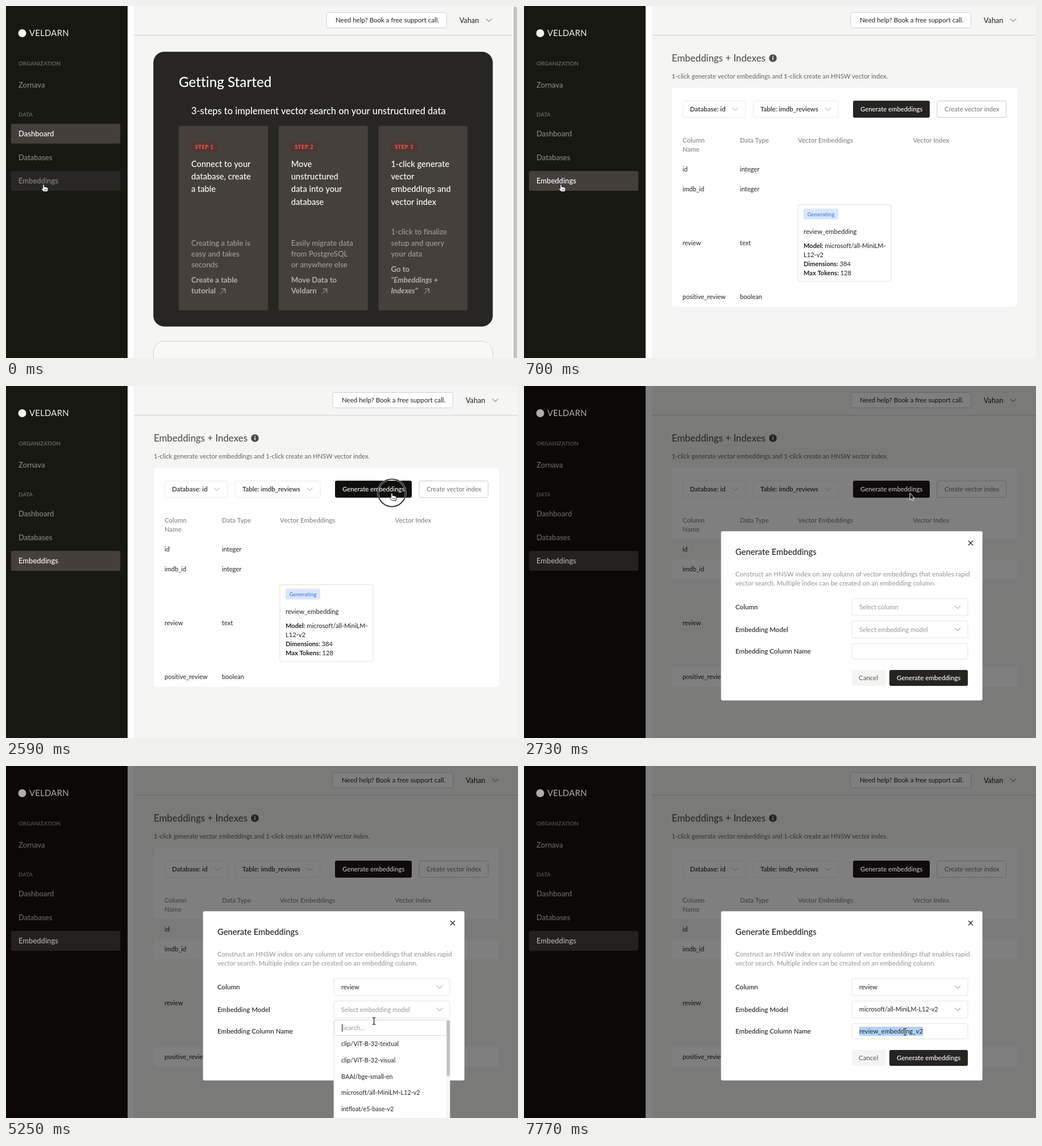
Animation, 901 px wide and 621 px high, one loop 8 s. Source, as an HTML page with a canvas:

```html
<!DOCTYPE html>
<html lang="en">
<head>
<meta charset="utf-8">
<title>Embeddings walkthrough</title>
<style>
html, body { margin: 0; width: 100%; height: 100%; overflow: hidden; background: #f5f5f3; }
canvas { display: block; width: 901px; height: 621px; }
</style>
</head>
<body>
<canvas id="stage"></canvas>
<script>
const W = 901, H = 621, LOOP = 8000, STEP = 70;
const canvas = document.getElementById('stage');
const c = canvas.getContext('2d');
const dpr = window.devicePixelRatio || 1;
canvas.width = W * dpr;
canvas.height = H * dpr;

const BG = '#f5f5f3', DARK = '#252420', INK = '#22211e', MUTED = '#8b8985';
const BRAND = 'Veldarn';
const LIT = { bar: '#181813', brand: '#f4f4f0', label: '#66635d', item: MUTED, on: '#fff',
  fill: '#453f3b', hover: '#282723', button: DARK, caption: '#fff' };
const DIM = { bar: '#0c0808', brand: '#b0aeac', label: '#4c4a48', item: '#6a6866', on: '#b5b3b0',
  fill: '#232020', hover: '#151212', button: '#0f0a0b', caption: '#c0bebc' };

// y is the middle of the capitals; any spacing above zero turns ligatures off
function txt(s, x, y, size, color, weight = 400, spacing = 0.01) {
  c.letterSpacing = spacing + 'px';
  c.font = `${weight} ${size}px Lato, Inter, sans-serif`;
  c.fillStyle = color;
  c.fillText(s, x, y + size * 0.36);
  return c.measureText(s).width;
}

function lines(list, x, y, pitch, size, color, weight) {
  list.forEach((s, i) => txt(s, x, y + i * pitch, size, color, weight));
}

function box(x, y, w, h, r, fill, border) {
  c.beginPath();
  c.roundRect(x, y, w, h, r);
  if (fill) { c.fillStyle = fill; c.fill(); }
  if (border) { c.strokeStyle = border; c.lineWidth = 1; c.stroke(); }
}

function stroke(points, color, width = 1) {
  c.beginPath();
  points.forEach(([x, y]) => c.lineTo(x, y));
  c.strokeStyle = color;
  c.lineWidth = width;
  c.stroke();
}

function disc(x, y, r, color) {
  c.beginPath();
  c.arc(x, y, r, 0, 7);
  c.fillStyle = color;
  c.fill();
}

const chevron = (x, y, color) =>
  stroke([[x - 5, y - 2.5], [x, y + 2.5], [x + 5, y - 2.5]], color);

function diagonal(x, y, color) {
  stroke([[x - 4.5, y + 4.5], [x + 4, y - 4]], color);
  stroke([[x - 3.5, y - 4], [x + 4, y - 4], [x + 4, y + 3.5]], color);
}

function sidebar(tone, active, hover) {
  c.fillStyle = tone.bar;
  c.fillRect(0, 0, 214, H);
  disc(28.5, 48, 7, tone.brand);
  txt(BRAND.toUpperCase(), 41, 47.5, 14.8, tone.brand, 400, 0.3);
  txt('ORGANIZATION', 22, 102, 9.7, tone.label, 700);
  txt('Zornava', 22, 139.5, 13, tone.item, 500);
  txt('DATA', 22, 191.5, 9.7, tone.label, 700);
  ['Dashboard', 'Databases', 'Embeddings'].forEach((name, i) => {
    const y = 225.3 + i * 41.6, on = i === active;
    if (on || i === hover) box(8.8, y - 17.5, 192.4, 35, 3, on ? tone.fill : tone.hover);
    txt(name, 22, y, 13, on ? tone.on : tone.item, 500);
  });
}

function header(dx, right) {
  c.fillStyle = '#fff';
  c.fillRect(214, 0, 11, H);
  stroke([[225, 51.5], [right, 51.5]], '#d0d0ce');
  box(564 + dx, 11.5, 211.5, 27, 3, '#fff', '#cfcfcd');
  txt('Need help? Book a free support call.', 580 + dx, 25, 11.5, INK);
  txt('Vahan', 798 + dx, 25, 12.6, INK);
  chevron(850 + dx, 25, '#44423e');
}

const STEPS = [
  { head: ['Connect to your', 'database, create', 'a table'],
    body: ['Creating a table is', 'easy and takes', 'seconds'],
    link: ['Create a table', 'tutorial'], arrow: 78 },
  { head: ['Move', 'unstructured', 'data into your', 'database'],
    body: ['Easily migrate data', 'from PostgreSQL', 'or anywhere else'],
    link: ['Move Data to', BRAND], arrow: 81 },
  { head: ['1-click generate', 'vector', 'embeddings and', 'vector index'],
    body: ['1-click to finalize', 'setup and query', 'your data'],
    link: ['"Embeddings +', 'Indexes"'], arrow: 85, lead: 'Go to' }
];

function dashboard() {
  header(0, 891);
  c.fillStyle = '#fafafa';
  c.fillRect(891, 0, 10, H);
  box(893, 1, 6.5, 625, 3, '#c3c3c1');
  box(259.3, 80.7, 597.3, 484.7, 19, '#272622');
  box(259.5, 591.5, 597, 80, 19, '#f8f8f7', '#d2d2d0');
  txt('Getting Started', 304, 134, 24.2, '#fff', 500);
  txt('3-steps to implement vector search on your unstructured data', 326, 185, 16.4, '#fff', 500);
  STEPS.forEach((s, i) => {
    const x = 304 + i * 175.7, tx = x + 22, up = s.lead ? 19.3 : 0;
    box(x, 211.5, 157, 325.5, 3, '#45403b');
    box(tx, 238.5, 46, 19, 3, '#503733');
    txt('STEP ' + (i + 1), tx + 6.5, 248, 9.8, '#fb5a51', 700, 0.3);
    lines(s.head, tx, 278.5, 22.3, 14.6, '#fff', 500);
    lines(s.body, tx, 418 - up, 19.2, 13.2, '#a39e98', 500);
    if (s.lead) txt(s.lead, tx, 464, 13.2, '#b4afa9', 700);
    lines(s.link, tx, 483, 19.3, 13.2, '#b4afa9', s.lead ? 'italic 700' : 700);
    diagonal(x + s.arrow, 503, '#b4afa9');
  });
}

function combo(x, w, label) {
  box(x + 0.5, 167.5, w, 29, 3, '#fff', '#ebebe9');
  txt(label, x + 13, 182, 11.5, INK, 500);
  chevron(x + w - 18, 182, '#a5a3a0');
}

function field(label, y, faded) {
  box(577, y - 15, 204, 30, 3, '#fff', '#e4e4e2');
  txt(label, 590, y, faded ? 11.2 : 10.8, faded ? '#999793' : INK);
  chevron(763, y, '#85837f');
}

function generate(fill, caption) {
  box(579, 167, 135, 30, 3, fill);
  txt('Generate embeddings', 592, 182, 11.3, caption, 500);
}

function indexes(zebra) {
  header(11, W);
  txt('Embeddings + Indexes', 260, 92, 16.8, '#55534f', 500);
  disc(438, 92, 6.8, '#4c4a47');
  c.fillStyle = '#fff';
  c.fillRect(437.2, 90.8, 1.7, 4.6);
  c.fillRect(437.2, 88, 1.7, 1.7);
  txt('1-click generate vector embeddings and 1-click create an HNSW vector index.',
    260, 124, 11.1, '#65635f');
  box(260, 144.5, 608, 386, 5, '#fff');
  if (zebra) {
    c.fillStyle = BG;
    c.fillRect(260, 270, 608, 36);
    c.fillRect(260, 341, 608, 155);
  }
  combo(279, 110.5, 'Database: id');
  combo(403, 149.5, 'Table: imdb_reviews');
  box(727, 167.5, 121.5, 29, 3, '#fff', '#cacac8');
  txt('Create vector index', 740, 182, 11.2, '#73716d');

  lines(['Column', 'Name'], 279, 237, 16, 11.4, '#85837f', 500);
  txt('Data Type', 380, 237, 11.4, '#85837f', 500);
  txt('Vector Embeddings', 482, 237, 11.4, '#85837f', 500);
  txt('Vector Index', 684.5, 237, 11.4, '#85837f', 500);
  [['id', 'integer', 288], ['imdb_id', 'integer', 323.5],
   ['review', 'text', 418.5], ['positive_review', 'boolean', 513.5]].forEach(([name, type, y]) => {
    txt(name, 279, y, 11.1, INK);
    txt(type, 380, y, 11.1, INK);
  });

  box(482, 350.5, 164, 135.5, 2, '#fff', '#e0e0de');
  box(492, 357.5, 61, 19, 2, '#d9e7fd');
  txt('Generating', 498.5, 367.5, 9.8, '#4078e0', 500);
  txt('review_embedding', 492, 398, 11.3, INK);
  [['Model:', 'microsoft/all-MiniLM-', 423], ['Dimensions:', '384', 455],
   ['Max Tokens:', '128', 471]].forEach(([key, value, y]) => {
    const w = txt(key + ' ', 492, y, 11.1, INK, 700);
    txt(value, 492 + w, y, 11.1, INK);
  });
  txt('L12-v2', 492, 439, 11.1, INK);
}

const MODELS = ['clip/ViT-B-32-textual', 'clip/ViT-B-32-visual', 'BAAI/bge-small-en',
  'microsoft/all-MiniLM-L12-v2', 'intfloat/e5-base-v2'];

function search(y, w, caret) {
  box(577.5, y + 0.5, w, 27, 2, '#fff', '#dcdcda');
  txt('Search...', 590, y + 14, 11.2, '#999793');
  if (caret) stroke([[591.5, y + 7], [591.5, y + 21]], '#222');
}

function shade() {
  c.fillStyle = 'rgba(0,0,0,.5)';
  c.fillRect(0, 0, W, H);
}

function modal(t) {
  box(346.7, 256.2, 460, 298.5, 3, '#fff');
  stroke([[782, 273], [790, 281]], '#222', 1.3);
  stroke([[790, 273], [782, 281]], '#222', 1.3);
  txt('Generate Embeddings', 372, 293, 14.7, INK, 500);
  lines(['Construct an HNSW index on any column of vector embeddings that enables rapid',
    'vector search. Multiple index can be created on an embedding column.'],
    372, 331.5, 16, 11.4, '#94928e');
  txt('Column', 372, 390, 11.6, INK, 500);
  txt('Embedding Model', 372, 429.5, 11.6, INK, 500);
  txt('Embedding Column Name', 372, 468, 11.6, INK, 500);

  const column = t >= 4410, model = t >= 6510;
  field(column ? 'review' : 'Select column', 390, !column);
  field(model ? MODELS[3] : 'Select embedding model', 429.5, !model);
  box(577, 454.5, 204, 27, 3, '#fff', '#e4e4e2');
  if (model) {
    const name = 'review_embedding_v2';
    c.font = '400 11.4px Lato, Inter, sans-serif';
    if (t >= 7560) {
      c.fillStyle = '#b0d3fb';
      c.fillRect(590, 460, c.measureText(name).width, 16);
    }
    txt(name, 590, 468, 11.4, INK);
  }
  box(577, 501, 60, 28, 3, '#f4f4f2');
  txt('Cancel', 589, 515, 11.5, '#65635f', 500);
  box(643, 501, 138, 28, 3, DARK);
  txt('Generate embeddings', 656, 515, 11.6, '#fff', 500);

  if (t >= 3710 && t < 4410) {
    box(577, 408, 204, 57, 2, '#fff', '#e2e2e0');
    search(408, 203, true);
    txt('review', 590, 450.5, 10.8, INK);
  }
  if (t >= 4970 && t < 6510) {
    box(577, 448, 204, 200, 2, '#fff', '#e2e2e0');
    search(448, 197.5, t < 5530);
    lines(MODELS, 590, 490.5, 28.7, 10.8, INK);
    c.fillStyle = '#f6f6f5';
    c.fillRect(775, 448, 6, H - 448);
    box(775.5, 448.5, 5.5, 98.5, 2.5, '#c1c1bf');
  }
}

const HAND = new Path2D('M-1.3 8V1.3Q-1.3 0 0 0Q1.3 0 1.3 1.3V4.6Q2.6 3.8 3.4 5Q4.8 4.3 5.6 5.6Q7.8 5 8.2 7.2V9.5L7 13H0.6L-3.7 8.8Q-4 6.6-2.4 7.2Z');
const ARROW = new Path2D('M0 0V12L2.8 9.4L4.8 13.6L6.6 12.8L4.7 8.7H8.4Z');

// time, x, y, cursor used up to that time
const PATH = [
  [0, 66, 314.5, 'hand'], [70, 65, 314.5, 'hand'], [770, 65, 314.5, 'hand'],
  [1330, 735, 170, 'arrow'], [1610, 681.5, 191, 'hand'], [1750, 679, 189, 'hand'],
  [2660, 679, 189, 'hand'], [2940, 679, 189, 'arrow'], [3430, 692, 392, 'arrow'],
  [3710, 693, 397, 'hand'], [3990, 693.5, 417, 'beam'], [4200, 655, 452, 'hand'],
  [4340, 650, 452, 'hand'], [4620, 653, 498, 'arrow'], [4830, 650, 437, 'hand'],
  [5040, 650, 437, 'hand'], [5250, 647.5, 450, 'beam'], [5460, 647.5, 453, 'beam'],
  [5880, 667, 578, 'hand'], [6440, 667, 578, 'hand'], [6930, 662, 480, 'arrow'],
  [7070, 662, 482, 'arrow'], [7140, 662, 482, 'arrow'], [7280, 670.5, 474, 'beam'],
  [7350, 670.5, 474, 'beam'], [7770, 670.5, 469, 'beam']
];
const CLICKS = [[350, 420], [2590, 2730], [3570, 3710], [4270, 4410], [4830, 4970], [6300, 6440]];

function cursor(t) {
  const i = Math.max(1, PATH.findIndex(k => k[0] >= t));
  const a = PATH[i - 1], b = PATH[i];
  const p = (t - a[0]) / (b[0] - a[0]), e = p * p * (3 - 2 * p);
  const x = a[1] + (b[1] - a[1]) * e, y = a[2] + (b[2] - a[2]) * e;

  if (CLICKS.some(([on, off]) => t >= on && t < off)) {
    c.beginPath();
    c.arc(x, y - 0.5, 24.3, 0, 7);
    c.strokeStyle = 'rgba(255,255,255,.75)';
    c.lineWidth = 3;
    c.stroke();
    c.strokeStyle = '#111';
    c.lineWidth = 1.6;
    c.stroke();
  }
  c.save();
  c.translate(x, y);
  if (b[3] === 'beam') {
    for (const [color, w] of [['rgba(255,255,255,.8)', 2.6], ['#111', 1.2]]) {
      stroke([[0, -5], [0, 5]], color, w);
      stroke([[-3, -6], [-1, -6], [0, -5], [1, -6], [3, -6]], color, w);
      stroke([[-3, 6], [-1, 6], [0, 5], [1, 6], [3, 6]], color, w);
    }
  } else {
    const hand = b[3] === 'hand', shape = hand ? HAND : ARROW;
    c.fillStyle = hand ? '#fff' : '#111';
    c.strokeStyle = hand ? '#111' : '#fff';
    c.lineWidth = 1;
    c.lineJoin = 'round';
    c.fill(shape);
    c.stroke(shape);
    if (hand) [1.8, 3.7, 5.6].forEach(k => stroke([[k, 8], [k, 11]], '#333', 0.7));
  }
  c.restore();
}

function draw(now) {
  const t = Math.min(7770, Math.floor((now % LOOP) / STEP) * STEP);
  c.setTransform(dpr, 0, 0, dpr, 0, 0);
  c.fillStyle = BG;
  c.fillRect(0, 0, W, H);
  const home = t < 700, open = t >= 2730, tone = open ? DIM : LIT;
  if (home) dashboard();
  else indexes(open);
  if (open) shade();
  sidebar(tone, home ? 0 : 2, home ? 2 : -1);
  if (!home) generate(t >= 1540 && !open ? '#0e0e0c' : tone.button, tone.caption);
  if (open) modal(t);
  cursor(t);
}

const start = performance.now();
function tick() {
  draw(performance.now() - start);
  requestAnimationFrame(tick);
}
tick();
</script>
</body>
</html>
```
